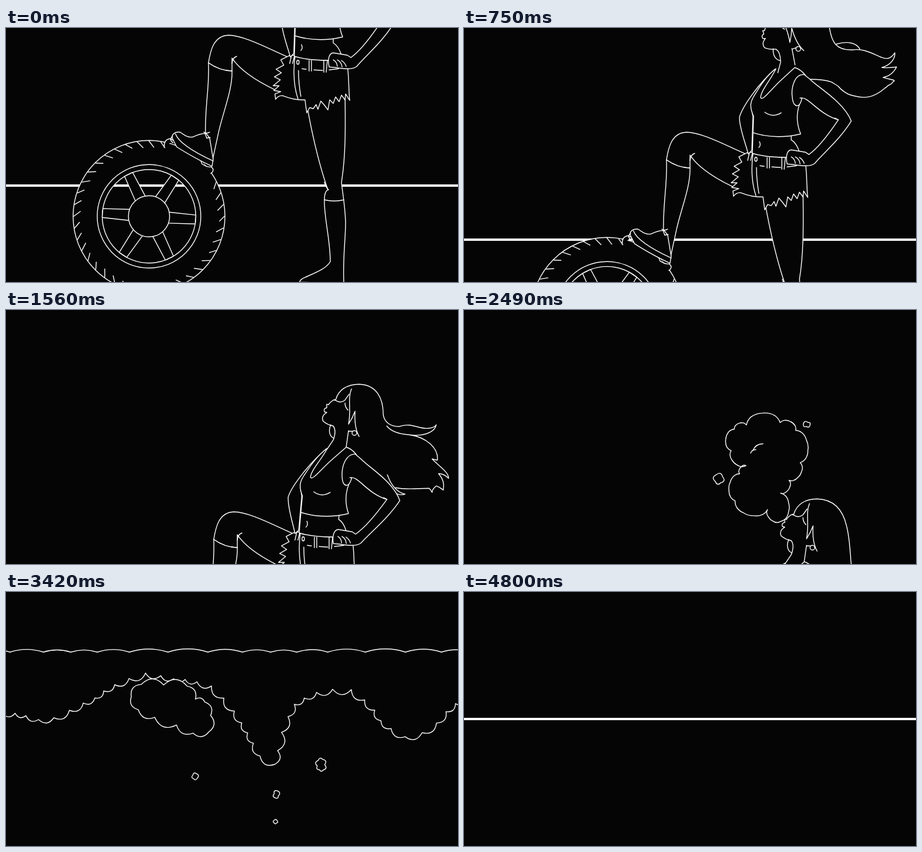
Write an HTML page that moves like this. It is 768 px wide and 432 px high and loops after 4830 ms.

```html
<!DOCTYPE html>
<html lang="en">
<head>
<meta charset="utf-8">
<title>Smoke and horizon</title>
<style>
html, body { margin: 0; width: 100%; height: 100%; overflow: hidden; background: #050505; }
svg { display: block; width: 100vw; height: 100vh; }
g, path { fill: #050505; stroke: #fff; stroke-width: 1.4; stroke-linejoin: round; stroke-linecap: round; }
.open { fill: none; }
#horizon { stroke-width: 4; stroke-linecap: butt; }
</style>
</head>
<body>
<svg viewBox="0 0 768 432">
  <path id="horizon" d="M0 0H768"/>

  <g id="scene">
    <g id="hairBox"><path id="hair" class="open"/></g>

    <g id="legs">
      <g id="wheel"></g>
      <path d="M576 110C577 170 577 220 570 262C571 275 576 300 577 330C577 360 572 390 574 434L499 432Q499 428 508 424C530 414 545 408 551 397C551 360 540 320 541 292Q541 278 547 275C531 230 520 180 511 130"/>
      <path class="open" d="M541 292Q558 296 574 292M541 262Q543 270 548 275"/>
      <path d="M481 50C450 37 405 12 378 12C352 13 347 40 344 59Q362 72 384 73L384 51C400 75 430 92 457 105"/>
      <path class="open" d="M392 48Q385 50 384 60"/>
      <path d="M339 178C338 130 346 100 344 59Q362 72 384 73C385 105 368 145 361 178L351 224"/>
      <path d="M269 203Q268 189 279 188L284 191"/>
      <path d="M330 222L333 231Q342 237 349 236L352 240Q352 245 348 247"/>
      <path d="M283 188C280 180 288 176 296 177C303 182 310 187 318 185Q330 179 340 179L346 187L352 223L350 235Q320 221 290 202Z"/>
      <path class="open" d="M288 180C294 196 322 212 352 226M336 177Q341 180 346 177M338 178L341 187L347 186M283 184Q276 190 284 195"/>
      <path d="M481 47L467 54L472 63L459 70L468 76L456 83L466 88L454 98L464 98L455 106L467 108L457 112L458 121Q463 114 470 115C485 121 495 122 508 122L511 144L516 135L522 137L527 130L530 138L535 124L541 131L547 139L550 122L556 128L560 117L566 125L570 114L576 122L577 112L584 123C582 105 583 85 580 63L560 54Q520 57 490 46Z"/>
      <path class="open" d="M491 48C487 80 491 105 496 120M497 72C497 90 499 105 501 116M503 69L510 70M523 71L538 72M549 71L565 69M515 55L515 73M519 55L519 73M540 55L540 75M546 55L544 75M485 47L482 60M490 48L487 60M498 58A2 3.5 0 1 1 494 58A2 3.5 0 1 1 498 58"/>
    </g>

    <g id="torso">
      <path d="M528 70C500 95 472 135 468 152C468 170 478 195 483 214L489 208L491 150C485 130 500 100 528 70"/>
      <path d="M491 178L490 213Q520 222 569 219V208Q564 195 556 190V182"/>
      <path class="open" d="M502 193Q505 199 501 203"/>
      <path d="M491 178L492 150C483 130 489 122 493 115C505 95 515 80 530 69C520 90 505 105 504 118C507 125 520 106 537 90L562 67Q572 70 580 80L574 120C564 140 564 160 572 180Q530 190 491 178"/>
      <path class="open" d="M511 143Q525 153 539 144"/>
      <path d="M571 119C585 115 600 145 636 156C620 180 600 205 586 215L580 211L556 207C547 208 547 222 549 231L560 232Q588 237 596 230C610 213 640 188 658 158C645 125 600 100 588 87L578 79C562 78 555 100 558 120C560 134 570 138 574 120"/>
      <path class="open" d="M636 156L630 153M556 219Q562 222 563 230M563 219Q570 223 571 231M570 220Q576 224 578 230"/>
    </g>

    <g id="head">
      <path class="open" d="M552 195C547 205 550 215 557 218"/>
      <path class="open" d="M560 153L556 153Q549 158 548 161L545 160L545 166Q539 167 541 173L545 174L540 178Q536 184 539 189Q546 195 556 197Q562 205 556 221L546 236M582 205L578 233"/>
      <path class="open" d="M558 152Q568 160 576 153L583 143M576 158Q576 165 581 170M587 134C580 150 587 170 582 194Q589 183 593 172C592 190 595 206 600 215M582 206L589 206M596 209A4 4 0 1 1 588 209A4 4 0 1 1 596 209"/>
    </g>
  </g>

  <path id="cloud"/>
  <path id="blob"/>
  <path id="puffs"/>
</svg>

<script>
const LOOP = 4830;
const $ = id => document.getElementById(id);
const clamp = v => Math.max(0, Math.min(1, v));
const span = (t, a, b) => clamp((t - a) / (b - a));
const smooth = k => k * k * (3 - 2 * k);
const easeOut = k => 1 - (1 - k) * (1 - k);
const lerp = (a, b, k) => a + (b - a) * k;
const mixPts = (a, b, k) => a.map((p, i) => [lerp(p[0], b[i][0], k), lerp(p[1], b[i][1], k)]);
const pairs = s => s.split(' ').map(p => p.split(',').map(Number));

// Interpolate two path strings that share the same commands
function mixPath(a, b, k) {
  const nums = b.match(/-?[\d.]+/g);
  let i = 0;
  return a.replace(/-?[\d.]+/g, n => lerp(+n, +nums[i++], k).toFixed(2));
}

// Wheel
function buildWheel() {
  const at = (r, deg) => {
    const a = deg * Math.PI / 180;
    return (243 + r * Math.cos(a)).toFixed(1) + ' ' + (320 + r * Math.sin(a)).toFixed(1);
  };
  const ring = r => `M${243 + r} 320A${r} ${r} 0 1 1 ${243 - r} 320A${r} ${r} 0 1 1 ${243 + r} 320Z`;
  let ticks = '', spokes = '';
  for (let a = 0; a < 360; a += 9)
    if (a < 288 || a > 324) ticks += `M${at(128, a)}L${at(120 - 3 * Math.abs(Math.sin(a * 5)), a + 4)}`;
  for (let a = 4; a < 360; a += 60)
    spokes += `M${at(35, a - 15.5)}L${at(79.5, a - 5.5)}L${at(79.5, a + 5.5)}L${at(35, a + 15.5)}`;
  $('wheel').innerHTML =
    `<path fill-rule="evenodd" d="${ring(129)}${ring(79.5)}"/>` +
    `<path class="open" d="${ring(88)}${ticks}"/><path d="${spokes}"/><path d="${ring(35)}"/>`;
}

// Hair: blown up, streaming, hanging
const hairPoses = [
  'M519 159C518 140 529 127 548 120C576 108 610 128 621 166C625 190 632 204 660 203C680 200 695 210 710 216C722 221 728 214 732 208C733 220 722 230 710 233C718 234 728 233 735 232C730 242 722 248 712 250C718 252 726 253 731 255C731 256 730 257 729 257C728 259 726 261 724 262C723 262 722 263 722 263C720 264 719 265 718 266C717 267 715 268 714 269C695 285 680 286 662 281M662 281C650 279 640 270 636 265C632 262 628 260 625 258C615 254 600 253 588 253M673 203C668 190 650 188 633 193',
  'M560 153C565 135 580 126 600 126C630 127 641 150 641 178C643 192 655 198 668 198C690 190 700 203 718 201C726 200 730 197 731 195C728 210 705 215 685 212C715 216 735 235 733 255C731 255 727 254 724 253C735 265 752 275 752 286C747 281 740 278 735 278C745 290 744 298 743 306C738 302 734 300 731 299C726 303 724 306 724 310C722 306 720 304 719 303C700 303 680 306 662 302M648 280C655 300 665 310 678 313C670 315 665 314 660 310C640 295 620 270 600 253M685 212C670 211 655 207 647 197',
  'M560 153C565 135 580 126 600 126C632 127 645 150 650 172C656 195 656 220 658 238C662 260 664 280 664 300C664 305 664 310 664 315C663 316 661 317 660 318C662 322 664 326 664 330C661 328 658 325 656 322C658 328 660 334 660 340C657 336 654 331 652 326C654 331 655 336 654 342C650 338 648 333 646 328C646 332 645 336 644 340C642 336 641 333 640 330C637 329 634 327 630 325M630 325C625 322 620 318 616 312C612 306 608 300 606 295C602 285 600 270 600 253M650 270C650 262 648 254 646 246'
];

// Camera rise, nearly constant in speed
function pan(t) {
  if (t < 750) return t * 0.22;
  if (t < 1560) return 165 + (t - 750) * 0.205;
  return 331 + (t - 1560) * 0.2097;
}

function drawFigure(t) {
  const p = pan(t), lean = smooth(span(t, 750, 1560));
  $('scene').style.display = p < 800 && t < 3300 ? '' : 'none';
  $('legs').setAttribute('transform', `translate(${9 * lean} ${p})`);
  const skew = 0.055 * lean;
  $('torso').setAttribute('transform',
    `matrix(1 0 ${-skew} 1 ${8 * lean + skew * 215} ${p - 165})`);
  $('head').setAttribute('transform',
    `translate(0 ${p - 331}) rotate(${-19 * (1 - lean)} 557 277)`);
  $('hairBox').setAttribute('transform', `translate(0 ${p - 331})`);
  const fall = smooth(span(t, 1560, 2430));
  $('hair').setAttribute('d', t < 1560
    ? mixPath(hairPoses[0], hairPoses[1], lean)
    : mixPath(hairPoses[1], hairPoses[2], fall));
}

// n points along a polyline, unevenly spaced, end left out
function sample(text, n) {
  const pts = pairs(text), len = [0];
  for (let i = 1; i < pts.length; i++)
    len.push(len[i - 1] + Math.hypot(pts[i][0] - pts[i - 1][0], pts[i][1] - pts[i - 1][1]));
  return Array.from({ length: n }, (_, i) => {
    const d = (i + (i ? 0.22 * Math.sin(i * 7.3) : 0)) / n * len[len.length - 1];
    let j = 1;
    while (len[j] < d) j++;
    const k = (d - len[j - 1]) / (len[j] - len[j - 1]);
    return [lerp(pts[j - 1][0], pts[j][0], k), lerp(pts[j - 1][1], pts[j][1], k)];
  });
}

// Points along round lobes between nodes
function lobes(text, n, h) {
  const pts = pairs(text), out = [];
  for (let i = 0; i < pts.length - 1; i++) {
    const [x, y] = pts[i], dx = pts[i + 1][0] - x, dy = pts[i + 1][1] - y;
    for (let j = 0; j < n; j++) {
      const a = Math.PI * j / n, k = (1 - Math.cos(a)) / 2, b = h * Math.sin(a);
      out.push([x + dx * k + dy * b, y + dy * k - dx * b]);
    }
  }
  return out;
}

// Closed outline of bumps; bulge(i) is height over width
function scallop(pts, bulge) {
  let d = `M${pts[0][0].toFixed(2)} ${pts[0][1].toFixed(2)}`;
  pts.forEach(([x, y], i) => {
    const [u, v] = pts[(i + 1) % pts.length], b = 2 * bulge(i);
    d += `Q${((x + u) / 2 + (v - y) * b).toFixed(2)} ${((y + v) / 2 - (u - x) * b).toFixed(2)} ${u.toFixed(2)} ${v.toFixed(2)}`;
  });
  return d;
}

const TOP = 16;
const breath = [
  ...lobes('455,240 460,203 480,196 537,192 563,205', 4, 0.32),
  ...lobes('563,205 571,260 552,290 538,312 538,360', 5, 0.3),
  ...lobes('538,360 516,340 461,325 469,279 480,265 455,240', 5, 0.3)
];
const ceiling = [
  ...sample('-60,102 840,102', TOP),
  ...sample('840,170 768,186 742,208 725,232 683,249 640,224 626,200 592,166 540,165 492,187 470,230 463,262 457,293', 20),
  ...sample('457,293 430,278 417,250 402,225 390,205 372,182 350,160 312,149 275,147 245,135 200,150 170,165 145,185 120,192 100,207 65,220 20,206 -60,208', 25)
];
const thin = [
  ...sample('-60,191 840,191', TOP),
  ...sample('840,270 768,264 735,258 710,234 685,214 645,206 600,200 555,197 520,206 475,215 450,230 452,255 452,280 436,296', 20),
  ...sample('436,296 412,285 410,260 405,235 392,222 360,216 310,206 270,207 250,202 205,202 180,198 140,198 115,207 70,207 30,219 15,235 0,253 -60,260', 25)
];

function drawCloud(t) {
  const el = $('cloud');
  el.style.display = t > 2130 ? '' : 'none';
  if (t <= 2130) return;
  let pts, top, low, width = 1.4;
  if (t < 2490) {
    const s = Math.pow(span(t, 2130, 2490), 0.9), dy = pan(t) - pan(2490);
    pts = breath.map(([x, y]) => [540 + (x - 540) * s, 360 + dy + (y - 360) * s]);
    top = low = 0.08;
  } else if (t < 3420) {
    const u = span(t, 2490, 3420), k = easeOut(u), lift = 70 * Math.sin(Math.PI * u);
    pts = mixPts(breath, ceiling, k).map(([x, y]) => [x, y - lift]);
    top = 0.08;
    low = lerp(0.08, 0.28, k);
  } else if (t < 3840) {
    const k = span(t, 3420, 3840);
    pts = mixPts(ceiling, thin, k);
    top = lerp(0.08, 0.12, k);
    low = lerp(0.28, 0.25, k);
  } else {
    const k = span(t, 3840, 4640), line = lerp(191, 216, easeOut(span(t, 3840, 4250)));
    pts = thin.map(([x, y]) => [x, line + (y - 191) * (1 - k * k)]);
    top = 0.12 * (1 - k);
    low = 0.25 * (1 - k);
    width = lerp(1.4, 4, span(t, 4380, 4660));
  }
  el.style.strokeWidth = width;
  el.setAttribute('d', scallop(pts, i => i < TOP ? top : low));
  if (t > 4640) el.setAttribute('d', 'M-5 216H773');
  // Inner curl
  if (t > 2400 && t < 2580) {
    const y = lerp(244, 200, span(t, 2490, 2580));
    el.setAttribute('d', el.getAttribute('d') +
      `M487 ${y}q2 -6 9 -6M491 ${y - 5}q5 -11 17 -11`);
  }
}

const blobA = pairs('213,178 230,157 268,158 308,160 322,182 338,187 348,210 345,238 318,240 290,226 253,213 225,200');
const blobB = pairs('133,255 147,225 185,216 225,213 250,230 245,244 225,236 205,240 190,262 165,275 148,280 137,268');

function drawBlob(t) {
  const on = t > 3200 && t < 4260;
  $('blob').style.display = on ? '' : 'none';
  if (!on) return;
  const toward = (pts, x, y, s) => pts.map(p => [lerp(x, p[0], s), lerp(y, p[1], s)]);
  const pts = t < 3420 ? toward(blobA, 290, 140, smooth(span(t, 3200, 3420)))
    : t < 3840 ? mixPts(blobA, blobB, span(t, 3420, 3840))
    : toward(blobB, 175, 214, 1 - smooth(span(t, 3840, 4260)));
  $('blob').setAttribute('d', scallop(pts, () => 0.26));
}

// start, end, time of position, x, y, speed up, width, height
const puffs = [
  [2400, 2640, 2490, 583, 195, 0.15, 8, 5],
  [2400, 2640, 2490, 433, 288, 0.12, 10, 11],
  [3160, 3700, 3420, 321, 314, 0.1, 6, 7],
  [3200, 4080, 3420, 459, 345, 0.074, 5, 9],
  [3250, 3650, 3420, 458, 391, 0.14, 4.5, 4],
  [3100, 3740, 3420, 535, 295, 0.1, 9, 13]
];

function drawPuffs(t) {
  let d = '';
  for (const [a, b, ref, x, y, v, w, h] of puffs) {
    if (t <= a || t >= b) continue;
    const s = Math.min(1, 2.2 * Math.sin(Math.PI * (t - a) / (b - a)));
    const n = h > 12 ? 6 : 4, cy = y - v * (t - ref), ring = [];
    for (let i = 0; i < n; i++) {
      const q = i / n * 2 * Math.PI + x, r = s * (0.75 + 0.12 * Math.sin(i * 5));
      ring.push([x + w * r * Math.cos(q), cy + h * r * Math.sin(q)]);
    }
    d += scallop(ring, () => 0.38);
  }
  $('puffs').setAttribute('d', d);
}

function draw(t) {
  const y = 268 + 0.557 * pan(t);
  $('horizon').style.display = y < 436 ? '' : 'none';
  $('horizon').setAttribute('transform', `translate(0 ${y})`);
  drawFigure(t);
  drawCloud(t);
  drawBlob(t);
  drawPuffs(t);
}

buildWheel();
const start = performance.now();
function tick(now) {
  draw(Math.max(0, now - start) % LOOP);
  requestAnimationFrame(tick);
}
draw(0);
requestAnimationFrame(tick);
</script>
</body>
</html>
```
